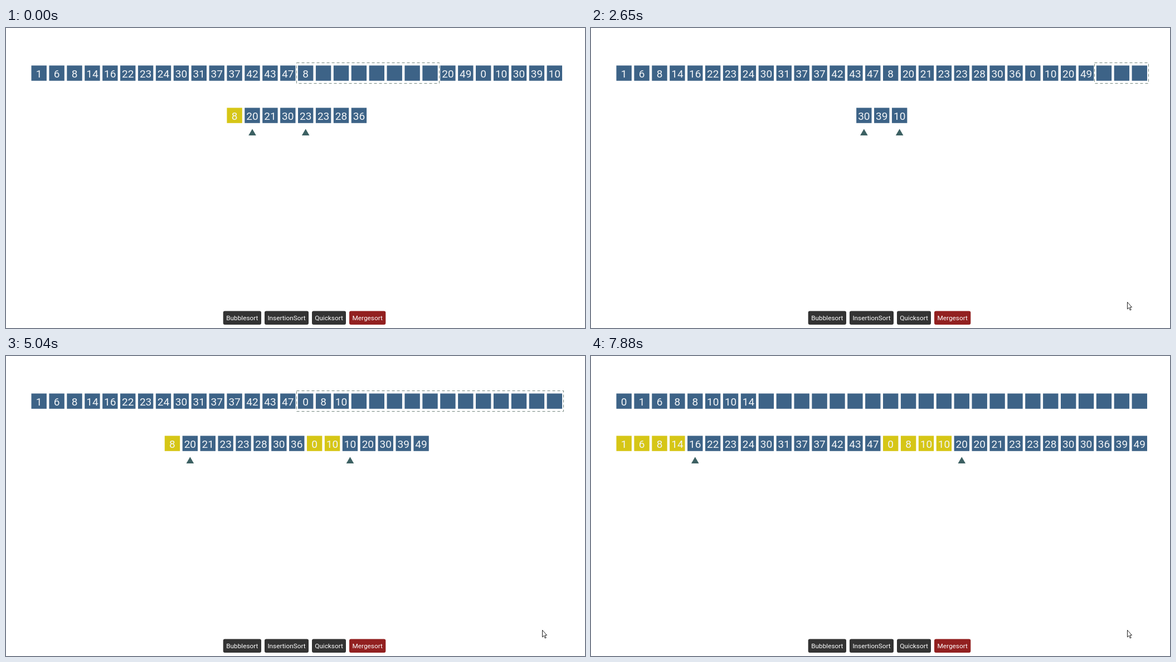
An HTML page with a canvas that plays this animation: 1039 by 539 pixels, repeating every 8 s.

```html
<!DOCTYPE html>
<html lang="en">
<head>
<meta charset="utf-8">
<title>Mergesort</title>
<style>
  html, body { margin: 0; width: 100%; height: 100%; overflow: hidden; background: #fff; }
  canvas { display: block; }
</style>
</head>
<body>
<canvas id="stage" width="1039" height="539"></canvas>
<script>
const ctx = document.getElementById('stage').getContext('2d');
const LOOP = 8000, PITCH = 31.9, CELL = 27.4, LEFT = 45.5;
const BLUE = '#3d6387', YELLOW = '#d6c616';
const MAIN_Y = 67.4, BUFFER_Y = 143.4;

const values = [1, 6, 8, 14, 16, 22, 23, 24, 30, 31, 37, 37, 42, 43, 47,
                8, 20, 21, 30, 23, 23, 28, 36, 20, 49, 0, 10, 30, 39, 10];
const steps = [];

function addStep(step) {
  steps.push({ main: values.slice(), marked: [], ...step });
}

// Ranges of one or two values are only highlighted.
function leaf(...marked) {
  addStep({ marked });
}

function merge(lo, hi) {
  const items = values.slice(lo, hi);
  const size = items.length, mid = Math.ceil(size / 2);
  const range = [lo, hi], used = new Set();
  const last = steps[steps.length - 1];
  let left = 0, right = mid;

  addStep({ range, marked: last ? last.marked : [], buffer: items.map(() => '') });
  values.fill('', lo, hi);
  for (let k = 0; k <= size; k++) {
    const pointers = [];
    if (left < mid) pointers.push(left);
    if (right < size) pointers.push(right);
    addStep({ range, buffer: items, used: new Set(used), pointers });
    if (k === size) break;
    const takeLeft = right >= size || (left < mid && items[left] < items[right]);
    const taken = takeLeft ? left++ : right++;
    used.add(taken);
    values[lo + k] = items[taken];
  }
  addStep({ range });
}

merge(15, 23);
leaf(23, 24);
leaf(25, 26);
merge(23, 27);
leaf(27, 28);
leaf(29);
merge(27, 30);
merge(23, 30);
merge(15, 30);
merge(0, 30);
steps.splice(0, 2); // the loop opens with one value already merged

// Steps come every 125 ms; every second one is slightly off the beat.
function stepStart(i) {
  const late = i >= 31 && i <= 43;
  return 40 + 125 * i + (i % 2 ? (late ? 20 : -40) : 0);
}

function stepAt(time) {
  let i = 0;
  while (i + 1 < steps.length && stepStart(i + 1) <= time) i++;
  return steps[i];
}

function drawCell(x, y, value, color) {
  ctx.fillStyle = color;
  ctx.fillRect(x, y, CELL, CELL);
  ctx.fillStyle = '#f3f5f7';
  ctx.font = '19px Roboto, sans-serif';
  ctx.fillText(value, x + CELL / 2, y + 21.2);
}

function drawPointer(x) {
  ctx.fillStyle = '#3c6062';
  ctx.beginPath();
  ctx.moveTo(x, 181.3);
  ctx.lineTo(x + 6.8, 193);
  ctx.lineTo(x - 6.8, 193);
  ctx.fill();
}

function drawRange([lo, hi]) {
  if (hi - lo === values.length) return;
  const x = Math.round(LEFT + lo * PITCH - 2.5) - 0.5;
  const right = Math.round(LEFT + hi * PITCH - 2.5) + 0.5;
  ctx.strokeStyle = '#74877f';
  ctx.lineWidth = 1;
  ctx.setLineDash([5, 4]);
  ctx.strokeRect(x, 62.5, right - x, 37);
  ctx.setLineDash([]);
}

function drawButton(label, x, width, color) {
  ctx.fillStyle = color;
  ctx.beginPath();
  ctx.roundRect(x, 508.5, width, 24.5, 3);
  ctx.fill();
  ctx.fillStyle = '#fff';
  ctx.font = '11.8px Roboto, sans-serif';
  ctx.fillText(label, x + width / 2, 525.3);
}

const cursor = new Path2D('M962.5 492.5v12.5l2.8-2.6 2 4.6 1.9-.8-2-4.5h3.4z');

function draw(time) {
  const { main, marked, range, buffer, used, pointers = [] } = stepAt(time);
  ctx.fillStyle = '#fff';
  ctx.fillRect(0, 0, 1039, 539);
  ctx.textAlign = 'center';

  main.forEach((value, i) =>
    drawCell(LEFT + i * PITCH, MAIN_Y, value, marked.includes(i) ? YELLOW : BLUE));
  if (range) drawRange(range);

  if (buffer) {
    const start = LEFT + (values.length - buffer.length) * PITCH / 2;
    buffer.forEach((value, i) =>
      drawCell(start + i * PITCH, BUFFER_Y, value, used && used.has(i) ? YELLOW : BLUE));
    pointers.forEach(i => drawPointer(start + i * PITCH + CELL / 2));
  }

  drawButton('Bubblesort', 389.7, 68.3, '#333');
  drawButton('InsertionSort', 464, 79, '#333');
  drawButton('Quicksort', 549, 61, '#333');
  drawButton('Mergesort', 616, 65.3, '#922020');

  if (time >= 290) {
    ctx.fillStyle = '#fff';
    ctx.fill(cursor);
    ctx.strokeStyle = '#222';
    ctx.lineWidth = 1;
    ctx.stroke(cursor);
  }
}

function tick() {
  draw(performance.now() % LOOP);
  requestAnimationFrame(tick);
}
tick();
</script>
</body>
</html>
```
